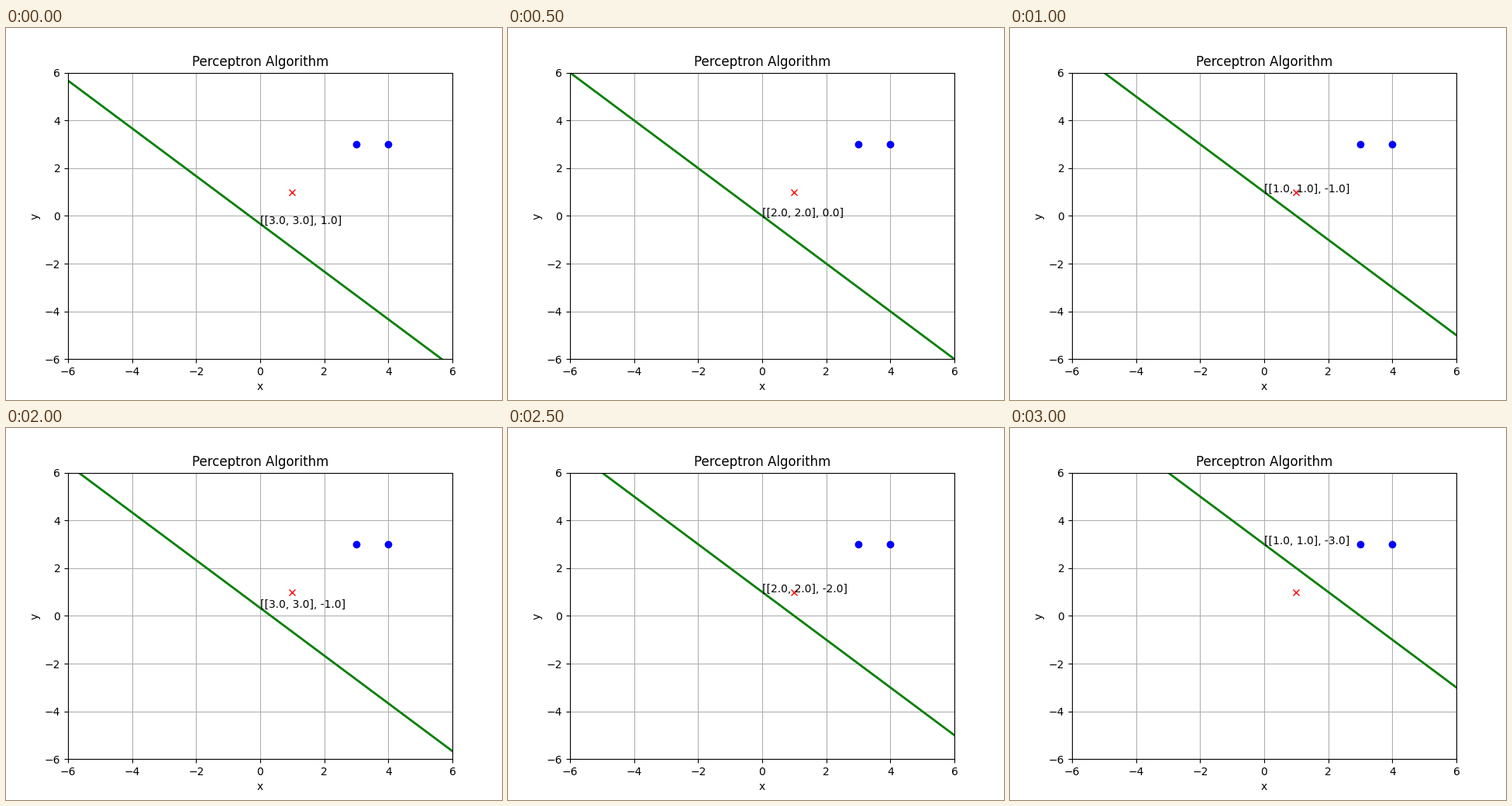
Animation of 640 by 480 pixels, one loop 3500 ms. Source, as a matplotlib script:

```python
import matplotlib.pyplot as plt
import numpy as np
from matplotlib.animation import FuncAnimation

SAMPLES = [((3, 3), 1), ((4, 3), 1), ((1, 1), -1)]
LIMIT = 6


def train(samples):
    """Return [weights, bias] after every update of the perceptron."""
    w, b = np.zeros(2), 0.0
    history = []
    while True:
        wrong = [(np.array(x), y) for x, y in samples if y * (w @ x + b) <= 0]
        if not wrong:
            return history
        x, y = wrong[0]
        w, b = w + y * x, b + y
        history.append([w.tolist(), float(b)])


def visible_state(step):
    """Latest state whose boundary is defined; zero weights keep the last line."""
    return next(s for s in reversed(history[:step + 1]) if s[0][1] != 0)


history = train(SAMPLES)

fig, ax = plt.subplots(figsize=(6.4, 4.8), dpi=100)
ax.set(xlim=(-LIMIT, LIMIT), ylim=(-LIMIT, LIMIT),
       xlabel="x", ylabel="y", title="Perceptron Algorithm")
ax.grid(True)

for point, label in SAMPLES:
    ax.plot(*point, "bo" if label > 0 else "rx")
boundary, = ax.plot([], [], "g", lw=2)
caption = ax.text(0, 0, "")


def update(step):
    state = visible_state(step)
    (w1, w2), b = state
    xs = np.array([-LIMIT - 1, LIMIT + 1])
    boundary.set_data(xs, -(b + w1 * xs) / w2)
    caption.set_position((0, -b / w2))
    caption.set_text(str(state))
    return boundary, caption


anim = FuncAnimation(fig, update, frames=len(history), interval=500,
                     repeat=True, repeat_delay=0, blit=False)
plt.show()
```
